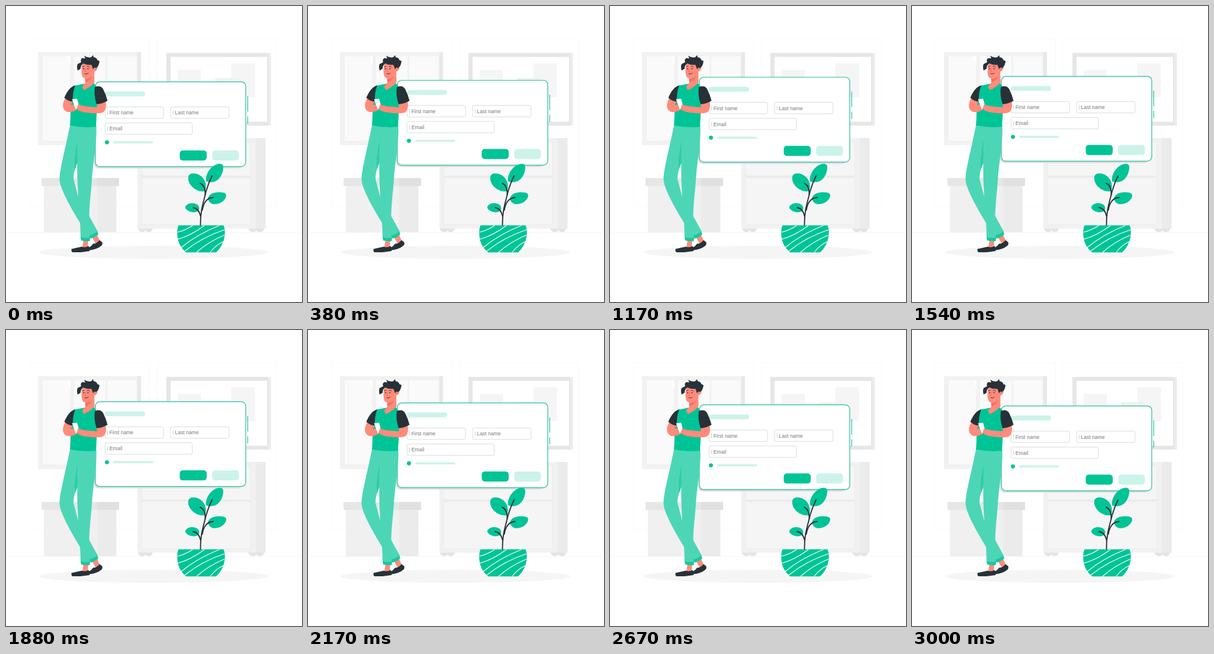
Write an HTML page that moves like this. It is 500 px wide and 500 px high and loops after 3040 ms.

```html
<!DOCTYPE html>
<html lang="en">
<head>
<meta charset="utf-8">
<title>Sign-up form</title>
<style>
  html, body { margin: 0; width: 100%; height: 100%; overflow: hidden; background: #fff; }
  svg { display: block; width: 100%; height: 100%; }
  text { font: 8.6px "Liberation Sans", Arial, sans-serif; fill: #757575; }
  .green { fill: #00c496; }
  .mint { fill: #ccf3ea; }
  .pants { fill: #4dd6b6; }
  .dark { fill: #263238; }
  .skin { fill: #ff8b7b; }
  .line { fill: none; stroke-linecap: round; stroke-linejoin: round; }
</style>
</head>
<body>
<svg viewBox="0 0 500 500">
  <!-- Room -->
  <g fill="none" stroke="#f9f9f9">
    <rect x="39.5" y="55.5" width="203" height="282.5"/>
    <rect x="255.5" y="55.5" width="202" height="282.5"/>
    <path d="M0 382.5H500" stroke="#f6f6f6"/>
  </g>

  <g id="window">
    <path d="M54 78H228V235H54Z" fill="#e8e8e8"/>
    <path d="M54 78H222V235H54Z" fill="#f2f2f2"/>
    <path d="M62 85H220V227H62Z" fill="#fafafa"/>
    <path d="M108 85H115V227H108ZM168 85H171V227H168Z" fill="#f2f2f2"/>
    <path d="M103 85H109V100Z" fill="#fff"/>
  </g>

  <g id="picture">
    <path d="M271 79.5H447.5V202H271Z" fill="#ececec"/>
    <path d="M271 79.5H443V202H271Z" fill="#e6e6e6"/>
    <path d="M278 86H441V195.5H278Z" fill="#fff"/>
    <path d="M290 108H329V152H290ZM380.5 97H420.500V154H380.5Z" fill="#f5f5f5"/>
    <path d="M353.5 122H393V160H353.5Z" fill="#f0f0f0"/>
  </g>

  <g id="cabinet">
    <path d="M223 375.5H248Q247 382 241 382Q237 382 236 379Q234 382 230 382Q224 382 223 375.5ZM409 375.5H436Q435 382 429 382Q425 382 423 379Q421 382 417 382Q411 382 409 375.5Z" fill="#e4e4e4"/>
    <path d="M222 223H438.5V376H222Z" fill="#ebebeb"/>
    <path d="M222 223H422V376H222Z" fill="#f1f1f1"/>
    <path d="M229 229H413.5V287H229ZM229 290H413.5V369.5H229Z" fill="#f5f5f5" stroke="#ebebeb"/>
    <path d="M229 288H413.5" stroke="#e8e8e8" stroke-width="1.500"/>
  </g>

  <g id="box">
    <path d="M64 304H155V382H64Z" fill="#f0f0f0"/>
    <path d="M154 304H186.5V382H154Z" fill="#ebebeb"/>
    <path d="M60 290.5H154V304H60Z" fill="#e6e6e6"/>
    <path d="M154 290.5H191V304H154Z" fill="#e0e0e0"/>
  </g>

  <ellipse cx="249.5" cy="416" rx="193.5" ry="11" fill="#f5f5f5"/>

  <!-- Floating form -->
  <g id="card">
    <rect x="148.7" y="131.3" width="250.5" height="143.5" rx="8" fill="#dedede"/>
    <rect x="151" y="128.3" width="254" height="143.3" rx="7.500" fill="#fff" stroke="#1fbf9c" stroke-width="1.200"/>
    <path d="M408.3 152.8V178.8M408.3 186.8V198.8" stroke="#1fbf9c" stroke-width="1.200"/>
    <rect class="mint" x="167" y="144.6" width="68" height="8.200" rx="4"/>
    <g fill="#fff" stroke="#d9dddd">
      <rect x="167.3" y="170.8" width="98.700" height="19.300" rx="2.500"/>
      <rect x="278" y="170.8" width="98.700" height="19.300" rx="2.500"/>
      <rect x="167.3" y="197.8" width="147.300" height="19.300" rx="2.500"/>
      <path d="M171.5 176.800V184.300M282.3 176.800V184.300M171.5 203.800V211.300" stroke="#c4c8c8" stroke-width=".8"/>
    </g>
    <text x="174.8" y="183.6">First name</text>
    <text x="285.4" y="183.6">Last name</text>
    <text x="174.8" y="210.6">Email</text>
    <circle class="green" cx="170.5" cy="230.5" r="3.400"/>
    <rect class="mint" x="181" y="228.800" width="67.500" height="3.500" rx="1.700"/>
    <rect class="green" x="293.5" y="244.3" width="45.500" height="17" rx="5"/>
    <rect class="mint" x="348.2" y="244.3" width="45.300" height="17" rx="5"/>
  </g>

  <g id="plant">
    <g class="green">
      <path d="M338 296C336 284 347 268 360 266.500Q367 266 367 272C367 286 358 297 348 297.500Q341 298 338 296Z"/>
      <path d="M337 311C340 299 334 286 320 283Q310 281.500 308 288C306 300 318 312 330 313Q336 314 337 311Z"/>
      <path d="M341 325C343 316 355 313 366 315Q372 316 372 320C371 330 359 336 349 334.500Q342 332 341 325Z"/>
      <path d="M303 339C306 332 318 331 324 336Q328 341 325 346C320 350 309 349 304 343Q302.500 341 303 339Z"/>
      <path d="M291.500 370.500H367.500Q370.500 377 369.500 388Q367 405 355 416.300H304Q291 405 289.500 389Q288.500 376 291.500 370.500Z"/>
    </g>
    <g class="line" stroke="#263238" stroke-width="1.900">
      <path d="M328.500 370C328 345 334 330 338 313Q342 299 348 287"/>
      <path d="M336.500 319Q337 303 328 299.500M331.500 345Q335 324 350 323.500M329 356Q326 342 316 340.500"/>
    </g>
    <path class="line" stroke="#fff" stroke-width="1.100" d="M290 382Q303 379 315 371M290 394Q312 388 335 371M296 408Q322 386 360 371M302 414Q332 390 369 378M322 416Q342 398 369 387M345 416Q354 404 367 398"/>
  </g>

  <g id="man">
    <path class="skin" d="M131 395H139L138 408H129ZM145 390L154 387L159 398L152 402Z"/>
    <path class="dark" d="M110.500 410.500L128 406.500Q134 409 139 405.500Q143 408 141 414L126 416H112Q110 414 110.500 410.500ZM138 409Q144 406 147 401.500Q153 402 158 395.500L162.500 399Q163.500 403 161 405Q154 411 141 412.500Q138 412 138 409Z"/>
    <path class="pants" d="M108 202L135 204L120 264C117 274 114 283 114 292L123 326L139 352L155 381L142 392C126 370 93 315 91 297C88 285 99 247 108 202Z"/>
    <path d="M122 222Q114 258 116.500 276L121 264Z" fill="#2ecca7"/>
    <path class="pants" d="M121 202H152.500C154 232 147 262 145 294C143 325 138 350 142 393L126 392C126 365 122 332 121 302C119.500 270 121 240 121 202Z"/>
    <path d="M126 390.500Q134 393 142 391L141.500 397Q134 398 127 396ZM140.500 387.500Q149 386 154 380.500L156 386Q150 391 143 393Z" fill="#18c8a0"/>

    <path class="green" d="M131 131.500L116 134.500C106 150 111 175 108 202Q130 206 152 204L154 168Q148 150 153 137L149 131Z"/>
    <path class="skin" d="M133 117L149 106L149.500 129Q144 136 132 142Q127 137 130 134L134 130Z"/>
    <path d="M134 123Q142 123 146 117Q143 127 134 129Z" fill="#ec7667"/>

    <path class="skin" d="M101 154L114 160L109 167L121 166Q124 173 118 176Q104 183 98 175Q93 167 101 154Z"/>
    <path class="dark" d="M117 134Q106 137 98.500 155Q105 161 113 161.500Q112 146 117 134Z"/>
    <path d="M111.500 157.500L120 156.500L123 167L118 175Z" fill="#fff"/>
    <path class="skin" d="M153 162L168 160Q171 172 165 179Q159 183 136 180Q125 179 119.500 174L121.500 166Q128 170 154 171Z"/>
    <path class="dark" d="M150 137Q159 133 164 140Q169 150 171.500 160Q164 165 153 166Q148 151 150 137Z"/>

    <path class="skin" d="M129 97Q126 111 129 119Q132 124 140 122Q147 119 149 111Q156 108 154 102L147 96Z"/>
    <path class="dark" d="M121 109Q119 103 121 98L127 95Q125 90 129 88L134 88.500L132 84Q138 88 144 86.500L147 83L148 86.500Q153 87 154.500 91.500L158 93Q157 102 152 105Q149 102 147 107L144.500 99.500Q136 100 130.500 97Q126 100 126 106Z"/>
    <g class="dark">
      <circle cx="131.200" cy="106" r=".9"/>
      <circle cx="138.500" cy="106" r=".9"/>
    </g>
    <path class="line" stroke="#263238" stroke-width=".9" d="M129 102.500L132 102M137 102Q139 101 141 103M133 114.500Q136 116 139 113.500"/>
    <path class="line" stroke="#e46a5c" stroke-width=".8" d="M134.500 105L133 110.500H135M151 104Q149 105 150 108"/>
  </g>
</svg>
<script>
  const LOOP = 3040, RISE = 1500, LEAD = 40, HEIGHT = 10;
  const card = document.getElementById("card");

  // Linear rise and fall; the loop starts slightly into the rise.
  function draw(now) {
    const t = now % LOOP + LEAD;
    const lift = HEIGHT * Math.max(0, 1 - Math.abs(t - RISE) / RISE);
    card.setAttribute("transform", `translate(0 ${-lift})`);
    requestAnimationFrame(draw);
  }
  draw(0);
</script>
</body>
</html>
```
